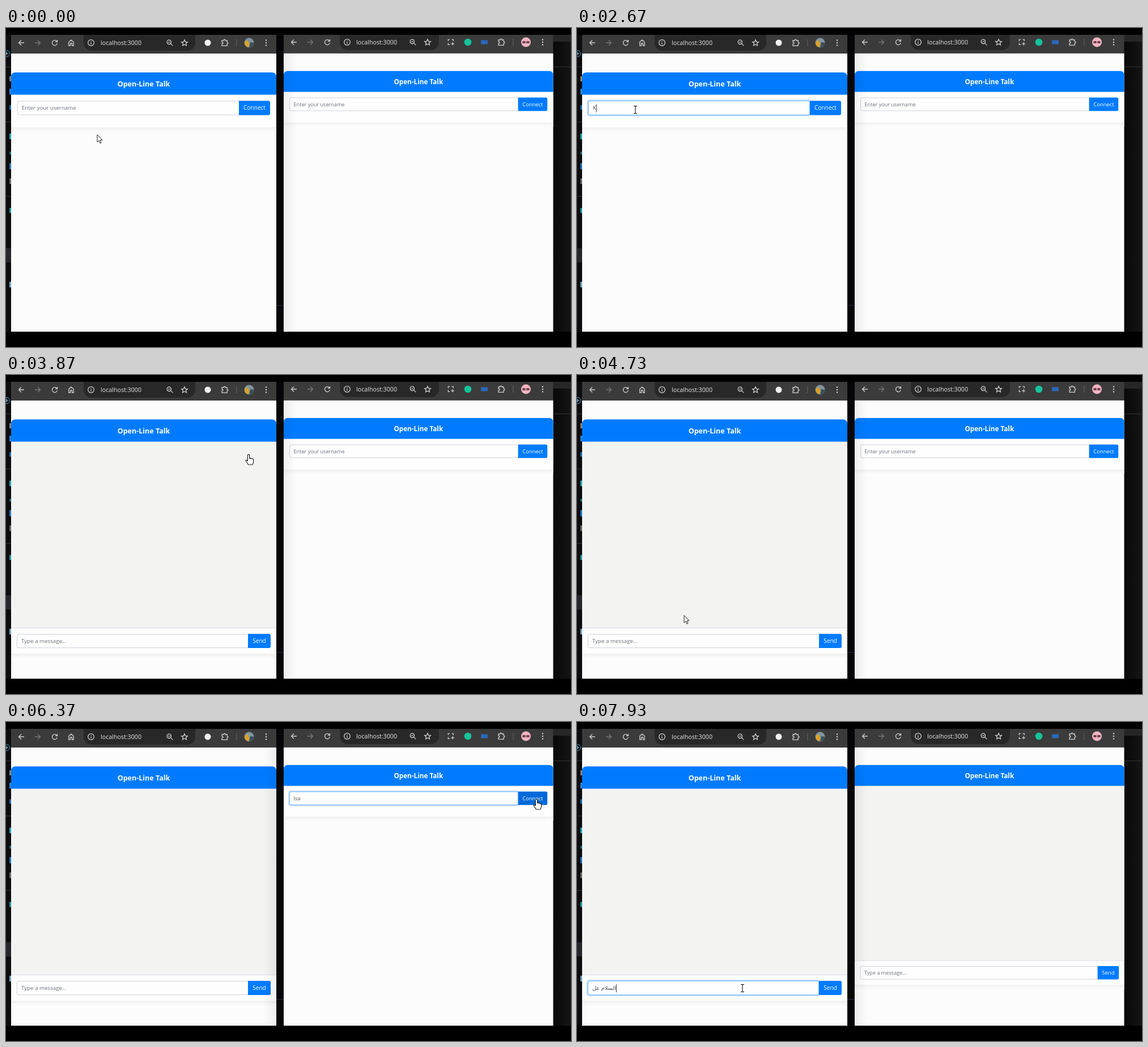
These frames come from a looping animation (997x562 px, 8000 ms). An HTML page:

```html
<!DOCTYPE html>
<html lang="en">
<head>
<meta charset="utf-8">
<title>Chat demo</title>
<style>
  html, body { margin: 0; width: 100%; height: 100%; overflow: hidden; background: #000; }
  svg { display: block; width: 997px; height: 562px; }
  text { font-family: "Open Sans", "Noto Sans", "DejaVu Sans", sans-serif; font-size: 9.74px; white-space: pre; }
  .title { font-size: 12.5px; font-weight: 700; fill: #fff; text-anchor: middle; }
  .label { font-size: 10.1px; fill: #fff; text-anchor: middle; }
  .url { font-size: 10.7px; fill: #e6e6e6; }
  .hint { fill: #6a7078; }
  .typed { fill: #495057; }
  .icon { fill: none; stroke: #d0d0d0; stroke-width: 1.3; }
</style>
</head>
<body>
<svg id="stage" viewBox="0 0 997 562"></svg>
<script>
const LOOP = 8000;
const stage = document.getElementById('stage');
const $ = id => document.getElementById(id);
const rect = (x, y, w, h, fill, more = '') =>
  `<rect x="${x}" y="${y}" width="${w}" height="${h}" fill="${fill}" ${more}/>`;
const circle = (x, y, r, fill, more = '') =>
  `<circle cx="${x}" cy="${y}" r="${r}" fill="${fill}" ${more}/>`;
const show = (id, on) => $(id).setAttribute('visibility', on ? 'inherit' : 'hidden');

// Key and click times are in ms; widths are in panel units before scaling.
const panels = [
  { id: 'a', x: 9, y: 117.5, w: 468, s: 1, barBottom: 45, join: 3800, release: 3880,
    name: { text: 'Karim', focus: 2400, start: 2670, step: 133 },
    message: { text: 'السلام عل', focus: 7400, start: 7430, step: 62 },
    popup: { x: 101, y: 155, times: [2700, 2850, 3210, 3390] } },
  { id: 'b', x: 490, y: 112.5, w: 507, s: 0.938, barBottom: 44.5, join: 6430, release: 6600,
    name: { text: 'Isa', focus: 5270, start: 5430, step: 135 },
    message: { text: '', focus: Infinity, start: Infinity, step: 1 },
    popup: { x: 581, y: 150, times: [5470, 5600, 5720, 5860] } }
];

const route = [
  [0, 161, 188], [30, 161, 188], [830, 87, 26], [900, 87, 26], [1270, 103, 144],
  [3500, 103, 144], [3730, 428, 140], [3880, 428, 140], [4300, 98, 409], [4430, 112, 475],
  [4570, 112, 475], [5230, 627, 130], [6030, 627, 130], [6330, 936, 136],
  [6600, 936, 136], [7330, 292, 469], [LOOP, 292, 469]
];

// Layout of the two forms inside a panel.
const forms = p => ({
  name: { left: 10.7, split: p.w - 66, right: p.w - 11, y: 10.7, h: 25.3, hint: 'Enter your username', button: 'Connect' },
  message: { left: 10, split: p.w - 50, right: p.w - 10, y: 338.6, h: 25, hint: 'Type a message...', button: 'Send' }
});

function field(id, f) {
  const { left, split, right, y, h } = f, base = y + h / 2 + 3.6;
  return `${rect(left + .5, y + .5, split - left, h - 1, '#fefefe', 'stroke="#cdd1dc" rx="2.5"')}
    <path id="${id}-button" fill="#007bff" d="M${split} ${y}H${right - 3}q3 0 3 3v${h - 6}q0 3 -3 3H${split}Z"/>
    <text class="label" x="${(split + right) / 2}" y="${base}">${f.button}</text>
    <g id="${id}-ring">
      ${rect(left - .8, y - .8, split - left + 1.6, h + 1.6, 'none', 'stroke="#007bff" stroke-opacity=".27" stroke-width="2.4" rx="3.5"')}
      ${rect(left + .5, y + .5, split - left - 1, h - 1, '#fefefe', 'stroke="#80bdff" rx="2.5"')}
    </g>
    <text id="${id}-hint" class="hint" x="${left + 8}" y="${base}">${f.hint}</text>
    <text id="${id}-typed" class="typed" x="${left + 8}" y="${base}"></text>
    ${rect(0, y + 6, 1, h - 11, '#333', `id="${id}-caret"`)}`;
}

function panel(p) {
  const f = forms(p), w = p.w;
  const card = h => rect(0, h, w, 8, 'url(#shade)') + rect(0, 0, w, h, '#fefefe');
  return `${rect(p.x, p.barBottom, w * p.s, 535 - p.barBottom, '#fcfcfc')}
    <g transform="translate(${p.x} ${p.y}) scale(${p.s})">
      <g id="${p.id}-login">${card(57.5)}${field(p.id + '-name', f.name)}</g>
      <g id="${p.id}-chat">${card(373.5)}${rect(0, 0, w, 328, '#f3f3f2')}
        ${rect(0, 327.6, w, 1, '#dcdce6')}${field(p.id + '-message', f.message)}</g>
      <path fill="#007bff" d="M0 0V-31.2q0-8 8-8H${w - 8}q8 0 8 8V0Z"/>
      <text class="title" x="${w / 2}" y="-14.8">Open-Line Talk</text>
    </g>`;
}

const glyphs = {
  back: '<path d="M5 0H-4.5M0-4.5L-4.5 0 0 4.5"/>',
  next: '<path stroke="#777" d="M-5 0H4.5M0-4.5L4.5 0 0 4.5"/>',
  reload: '<path d="M3.6-2.6A4.5 4.5 0 1 0 4.4 1.2M4.5-5V-1.6H1"/>',
  home: '<path d="M-4.3 5V-1.3L0-4.8 4.3-1.3V5H1.5V1H-1.5V5Z"/>',
  info: '<circle r="5.3"/><path d="M0-.8V3M0-3V-1.8"/>',
  zoom: '<circle cx="-1.2" cy="-1.2" r="3.7"/><path d="M1.6 1.6L5.4 5.4M-3-1.2H.6"/>',
  star: '<path d="M0-5.2L1.6-1.7 5.4-1.4 2.5 1.2 3.4 5 0 3-3.4 5-2.5 1.2-5.4-1.4-1.6-1.7Z"/>',
  puzzle: '<path d="M-5-4H-1.8Q-1.8-5.8-.4-5.8T1-4H4.2V-.8Q6-.8 6 .6T4.2 2V5.3H-5V2.2Q-3 2.2-3 .6T-5-1Z"/>',
  dots: [-4.5, 0, 4.5].map(y => circle(0, y, 1.2, '#d4d4d4', 'stroke="none"')).join(''),
  bar: '<path stroke="#666" stroke-width="1" d="M0-6V6"/>',
  capture: '<path d="M-4.7-2V-4.7H-2M1.6-4.7H4.3V-2M-4.7 1.6V4.3H-2M.4 2.8H6M3.2 0V5.6"/>',
  white: circle(0, 0, 5.5, '#f4f4f4', 'stroke="none"'),
  green: circle(0, 0, 6.3, '#15c39a', 'stroke="none"'),
  blue: rect(-6, -3.5, 12, 7, '#2a68b8', 'stroke="none"'),
  photo: `<g stroke="none">${circle(0, 0, 8.5, '#8296a0')}<path fill="#d9a227" d="M-8.2 1Q-7-4-2-4L1 4-2 8Q-7 6-8.2 1Z"/><path fill="#38505c" d="M0 8.4L2-1 8.4 0Q8 7 0 8.4Z"/></g>`,
  pink: `<g stroke="none">${circle(0, 0, 8.5, '#f3b4c2')}<path fill="#70414f" d="M-6-2H-.8V2H-6ZM.8-2H6V2H.8Z"/></g>`
};

function toolbar(x, w, y, bottom, pill, urlX, icons) {
  const [from, to] = pill;
  return rect(x, 12, w, bottom - 12, '#3b3b3b')
    + `<path fill="#282828" d="M${from} 12H${to}V${y}a14 14 0 0 1 -14 14H${from + 14}a14 14 0 0 1 -14 -14Z"/>`
    + (x < 100 ? circle(86, 26, 14, '#555', 'id="reload-hover"') : '')
    + Object.entries(icons).map(([name, at]) =>
      `<g class="icon" transform="translate(${at} ${y})">${glyphs[name]}</g>`).join('')
    + `<text class="url" x="${urlX}" y="${y + 3.8}">localhost:3000</text>`;
}

function desktop() {
  const specks = [[85, 9, '#8f806c'], [107, 10, '#2d83d4'], [136, 8, '#1769aa'], [186, 10, '#19a5b4'],
    [218, 5, '#146b70'], [238, 11, '#1e74c0'], [265, 10, '#666'], [317, 9, '#18939d'], [447, 10, '#6fa2c0']];
  return rect(0, 12, 997, 523, '#0d0d10') + rect(0, 388, 9, 25, '#26262d')
    + [68, 165, 296].map(y => rect(0, y, 9, 1, '#34343a')).join('')
    + specks.map(([y, h, color]) => rect(6, y, 3, h, color)).join('')
    + circle(1, 45, 5.5, 'none', 'stroke="#4b9bd0"') + '<path stroke="#8cc4e6" d="M0 45H4M1 42V48"/>'
    + rect(477, 12, 13, 523, '#060609') + rect(477, 488, 13, 1, '#28283c')
    + rect(965, 12, 32, 523, 'url(#side)') + rect(965, 12, 32, 12, '#262626') + rect(965, 68, 32, 1, '#333');
}

const popup = p => `<g id="${p.id}-popup" transform="translate(${p.popup.x} ${p.popup.y})">
    ${rect(-1, 6, 126, 38, '#000', 'rx="5" opacity=".08"')}
    <path fill="#3b3b3b" d="M11 7L17 0 23 7Z"/>${rect(0, 6.5, 124, 35, '#3b3b3b', 'rx="4"')}
    <text x="10" y="28" fill="#fff" font-weight="600">${p.name.text}</text></g>`;

stage.innerHTML = `<defs>
    <linearGradient id="shade" x2="0" y2="1"><stop stop-color="#efefee"/><stop offset="1" stop-color="#fcfcfc"/></linearGradient>
    <linearGradient id="side"><stop stop-color="#080808"/><stop offset="1" stop-color="#151515"/></linearGradient>
    <linearGradient id="cast"><stop stop-opacity=".06"/><stop offset="1" stop-opacity="0"/></linearGradient>
  </defs>${rect(0, 0, 997, 562, '#000')}${desktop()}${panels.map(panel).join('')}
  ${rect(490, 45, 22, 490, 'url(#cast)', 'id="cast-right"')}
  ${rect(-477, 45, 22, 490, 'url(#cast)', 'id="cast-left" transform="scale(-1 1)"')}
  ${toolbar(9, 468, 26, 45, [137, 334], 167, { back: 27, next: 56, reload: 86, home: 115, info: 150,
    zoom: 289, star: 315, white: 356, puzzle: 386, bar: 407, photo: 429, dots: 459 })}
  ${toolbar(490, 475.5, 25, 44.5, [589, 764], 618, { back: 508, next: 537, reload: 567, info: 602, zoom: 718,
    star: 744, capture: 785, green: 815, blue: 844, puzzle: 874, bar: 895, pink: 917.5, dots: 947 })}
  ${panels.map(popup).join('')}
  <g id="cursor" stroke-linejoin="round">
    <path id="arrow" fill="#fff" stroke="#222" d="M0 0V13L3 10.3 5 15 7 14.2 5 9.5H9Z"/>
    <path id="beam" fill="none" stroke="#111" stroke-width="1.1" d="M-3-6.5H-.7L0-6 .7-6.5H3M0-6V6M-3 6.5H-.7L0 6 .7 6.5H3"/>
    <path id="hand" fill="#fff" stroke="#222" stroke-width="1.2" d="M-1.6 1.2Q0-1 1.6 1.2V7Q3 5.6 4 7.2 5.6 6 6.4 7.8 8.4 7 8.6 9.2V13Q8.6 15 7 18H-.5Q-2 15-4.8 11.5-4.8 9.4-3 10L-1.6 11.6Z"/>
  </g>`;

function cursorAt(t) {
  const i = Math.max(1, route.findIndex(stop => stop[0] >= t));
  const [t0, x0, y0] = route[i - 1], [t1, x1, y1] = route[i];
  const k = (t - t0) / (t1 - t0), e = k * k * (3 - 2 * k);
  return { x: x0 + (x1 - x0) * e, y: y0 + (y1 - y0) * e };
}

function zone(p, f, c) {
  const x = (c.x - p.x) / p.s, y = (c.y - p.y) / p.s;
  if (y < f.y || y > f.y + f.h || x < f.left || x > f.right) return null;
  return x < f.split ? 'beam' : 'hand';
}

function drawField(id, f, entry, t, end, hovered) {
  const count = Math.min(entry.text.length, Math.max(0, Math.floor((t - entry.start) / entry.step) + 1));
  const focused = t >= entry.focus && t < end;
  const typed = $(id + '-typed');
  const text = entry.text.slice(0, count);
  if (typed.textContent !== text) typed.textContent = text;
  show(id + '-hint', !count);
  show(id + '-ring', focused);
  const lastKey = count ? entry.start + (count - 1) * entry.step : entry.focus;
  show(id + '-caret', focused && (t - lastKey) % 1000 < 500);
  $(id + '-caret').setAttribute('x', f.left + 8 + (count ? typed.getComputedTextLength() : 0));
  $(id + '-button').setAttribute('fill', hovered ? '#0069d9' : '#007bff');
}

const ramp = (t, a, b) => Math.min(1, Math.max(0, (t - a) / (b - a)));

function draw(t) {
  const c = cursorAt(t);
  let kind = 'arrow';
  for (const p of panels) {
    const f = forms(p), joined = t >= p.join;
    const active = t < p.release ? 'name' : 'message';
    const over = zone(p, f[active], c);
    if (over) kind = over;
    show(p.id + '-login', !joined);
    show(p.id + '-chat', joined);
    for (const key of ['name', 'message'])
      drawField(`${p.id}-${key}`, f[key], p[key], t, key === 'name' ? p.join : Infinity, key === active && over === 'hand');
    const [in0, in1, out0, out1] = p.popup.times;
    $(p.id + '-popup').setAttribute('opacity', ramp(t, in0, in1) - ramp(t, out0, out1));
  }
  // The focused window casts a soft shadow on its neighbour.
  const rightFocused = t >= panels[1].name.focus && t < panels[0].message.focus;
  show('cast-left', rightFocused);
  show('cast-right', !rightFocused);
  for (const id of ['arrow', 'beam', 'hand']) show(id, id === kind);
  show('reload-hover', Math.hypot(c.x - 86, c.y - 26) < 14);
  $('cursor').setAttribute('transform', `translate(${c.x} ${c.y})`);
}

const begin = performance.now();
function tick() {
  draw((performance.now() - begin) % LOOP);
  requestAnimationFrame(tick);
}
tick();
</script>
</body>
</html>
```
